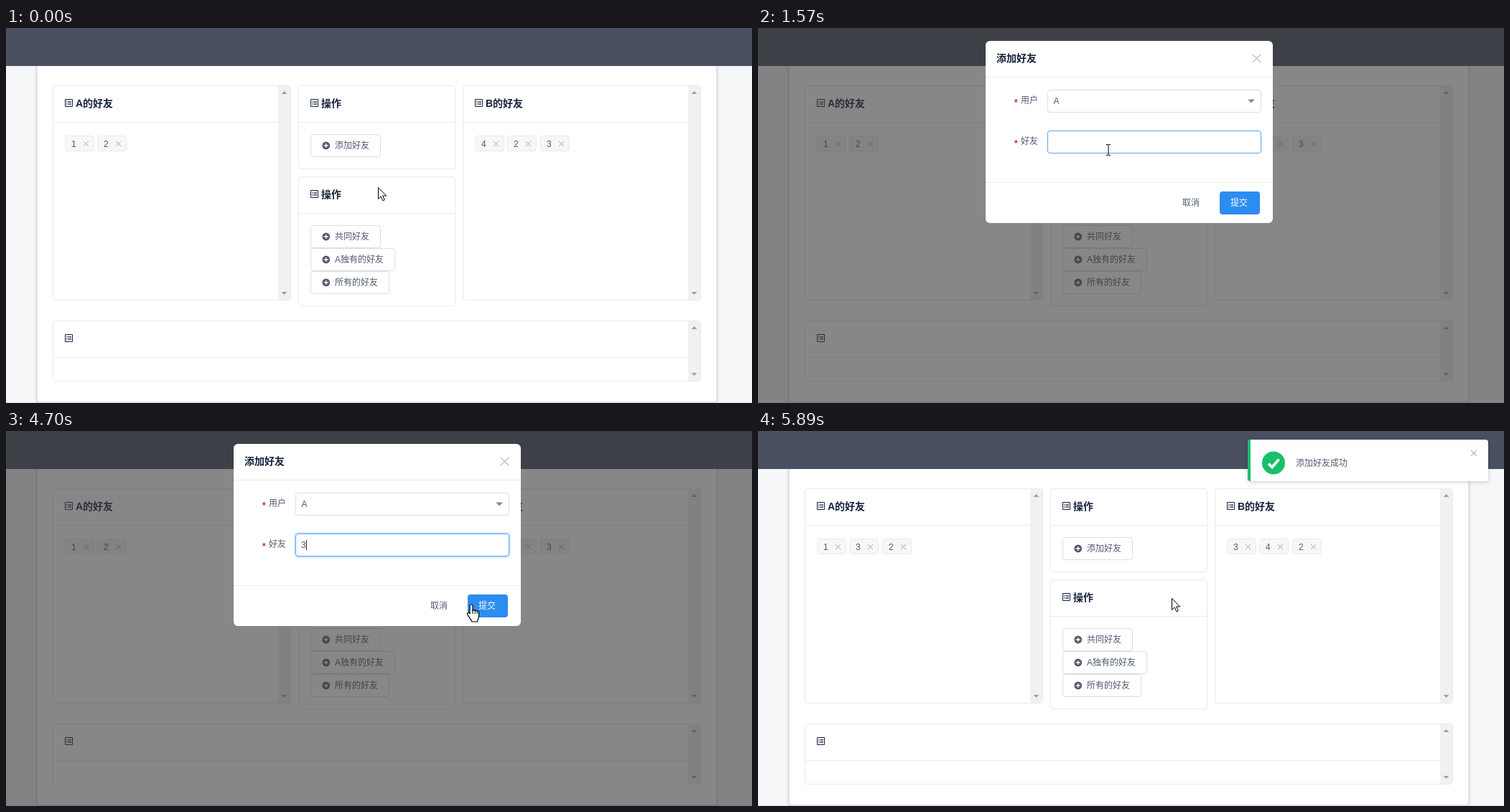
Recreate the animation shown at these times as an HTML page. Size 1039 by 523 pixels, loop 6670 ms.

```html
<!DOCTYPE html>
<html lang="zh-CN">
<head>
<meta charset="utf-8">
<title>好友</title>
<style>
  html, body { margin: 0; width: 100%; height: 100%; overflow: hidden; background: #f5f7f9; }
  svg { display: block; width: 1039px; height: 523px; }
  text { font: 12px "Liberation Sans", "Noto Sans CJK SC", "Noto Sans CJK", sans-serif; fill: #515a6e; white-space: pre; }
  .title { font-size: 14px; font-weight: 700; fill: #17233d; }
  .box { fill: #fff; stroke: #e8eaec; }
  .btn { fill: #fff; stroke: #dcdee2; }
  .line { fill: none; stroke: #e8eaec; }
  .glow { fill: none; stroke: #2d8cf0; stroke-opacity: .22; stroke-width: 2; }
  .pointer path { fill: #fff; stroke: #000; stroke-linejoin: round; }
  .pointer .bare { fill: none; }
  .soft { filter: drop-shadow(0 1px 3px rgba(0,0,0,.2)); }
</style>
</head>
<body>
<svg id="stage" viewBox="0 0 1039 523"></svg>
<script>
const LOOP = 6670;

// ---- markup helpers ----
const rect = (x, y, w, h, attrs = '') => `<rect x="${x}" y="${y}" width="${w}" height="${h}" ${attrs}/>`;
const frame = (x, y, w, h, attrs) => rect(x + .5, y + .5, w - 1, h - 1, 'rx="3.5" ' + attrs);
const text = (x, y, s, attrs = '') => `<text x="${x}" y="${y}" ${attrs}>${s}</text>`;
const path = (d, attrs = '') => `<path d="${d}" ${attrs}/>`;
const group = (id, body, attrs = '') => `<g id="${id}" ${attrs}>${body}</g>`;
const hline = (x1, x2, y) => path(`M${x1} ${y + .5}H${x2}`, 'class="line"');
const cross = (x, y, r, color = '#999') =>
  path(`M${x - r} ${y - r}l${2 * r} ${2 * r}m0 ${-2 * r}l${-2 * r} ${2 * r}`, `fill="none" stroke="${color}"`);

const listIcon = (x, y) =>
  path(`M${x + .5} ${y + .5}h10v10h-10z`, 'fill="none" stroke="#17233d"') +
  path(`M${x + 2} ${y + 3.5}h1.3m1 0h4.7m-7 2h1.3m1 0h4.7m-7 2h1.3m1 0h4.7`, 'fill="none" stroke="#2b3a58"');

function scrollbar(x, y, h) {
  const tri = (ty, d) => path(`M${x + 4.5} ${ty - 2 * d}h8l-4 ${4 * d}z`, 'fill="#a0a0a4"');
  return rect(x, y, 17, h, 'fill="#f0f1f1"') + tri(y + 9, -1) + tri(y + h - 9, 1);
}

function card(x, y, w, h, title, scroll) {
  return frame(x, y, w, h, 'class="box"') +
    hline(x + 1, x + w - 1, y + 51) +
    listIcon(x + 17, y + 19) + text(x + 32, y + 30, title, 'class="title"') +
    (scroll ? scrollbar(x + w - 18, y + 1, h - 2) : '');
}

function button(x, y, w, label, id = '') {
  return frame(x, y, w, 32, `class="btn" id="${id}Box"`) +
    `<circle cx="${x + 21.8}" cy="${y + 16}" r="5.4" fill="#515a6e"/>` +
    path(`M${x + 18.8} ${y + 16}h6m-3 -3v6`, 'stroke="#fff" stroke-width="1.3"') +
    text(x + 34, y + 20, label, `id="${id}Label"`);
}

const tag = (x, n) => frame(x, 150, 41, 22, 'fill="#f7f7f7" stroke="#e8eaec"') +
  text(x + 9, 166, n) + cross(x + 29.5, 161.5, 3.5, '#a0a4ac');
const tags = (x, list) => list.map((n, i) => tag(x + Math.round(i * 45.3), n)).join('');

const field = (id, y, label) =>
  text(357, y + 22, '*', 'style="fill:#b23a2c;font-weight:700"') + text(366, y + 19, label) +
  rect(402, y - 1, 300, 34, `rx="5" class="glow" id="${id}Glow"`) +
  frame(403, y, 298, 32, `class="btn" id="${id}Box"`);

// ---- scene ----
const page =
  rect(0, 0, 1039, 523, 'fill="#f5f7f9"') +
  rect(43.5, 40, 946, 481.5, 'rx="4" fill="#fff" style="filter:drop-shadow(0 1px 2px rgba(0,0,0,.3))"') +
  rect(0, 0, 1039, 53, 'fill="#4a4f62"') +
  rect(0, 522, 1039, 1, 'fill="#dcdfe2"') +
  card(65, 80, 332, 300, 'A的好友', true) +
  card(407, 80, 219, 117, '操作') +
  card(407, 207, 219, 181, '操作') +
  card(636, 80, 332, 300, 'B的好友', true) +
  card(65, 408, 903, 85, '', true) +
  button(424, 148, 98, '添加好友', 'add') +
  button(424, 275, 98, '共同好友', 'both') +
  button(424, 307, 118, 'A独有的好友', 'only') +
  button(424, 339, 110, '所有的好友', 'all') +
  group('before', tags(82, [1, 2]) + tags(653, [4, 2, 3])) +
  group('after', tags(82, [1, 3]) + tags(653, [3, 4, 2]) + group('added', tag(173, 2)));

const menu =
  rect(403, 123, 298, 67, 'rx="4" fill="#fff" class="soft"') +
  rect(403, 128, 298, 28.5, 'fill="#468fda"') +
  text(419, 146.5, 'A', 'style="fill:#fff;font-weight:700"') + text(419, 175, 'B');

const modal =
  rect(317, 18, 400, 254, 'rx="6" fill="#fff"') +
  text(332, 47, '添加好友', 'class="title"') + cross(694.5, 42.5, 5.5) +
  hline(317, 717, 68) + hline(317, 717, 215) +
  field('user', 86, '用户') + text(411.5, 106, 'A') +
  path('M-4.7 -2.5h9.4l-4.7 5z', 'id="caretDown" fill="#808695"') +
  field('friend', 143, '好友') + text(411, 163, '3', 'id="typed"') +
  rect(411, 152, 1, 14, 'id="caret" fill="#222"') +
  text(591, 248, '取消') +
  rect(642, 227, 58, 34, 'rx="5" class="glow" id="submitGlow"') +
  rect(643, 228, 56, 32, 'rx="4" id="submit"') +
  text(658, 248, '提交', 'style="fill:#fff;font-weight:500"') +
  group('menu', menu);

const notice =
  rect(0, 12, 335, 58, 'rx="4" fill="#fff" class="soft"') +
  path('M4 12v58a4 4 0 0 1 -4 -4v-50a4 4 0 0 1 4 -4z', 'fill="#19be6b"') +
  '<circle cx="36" cy="44.5" r="16" fill="#19be6b"/>' +
  path('M29 45.5l5 5 9.5 -11', 'fill="none" stroke="#fff" stroke-width="3.6"') +
  text(67, 48.5, '添加好友成功') + cross(315, 31, 4);

const pointers =
  group('arrow', path('M.5 .5v16l3.7 -3.6 2.7 6 2.4 -1.1 -2.6 -5.8h5z')) +
  group('hand',
    path('M-2 13V2a2 2 0 0 1 4 0V9a1.6 1.6 0 0 1 3.2 .4a1.5 1.5 0 0 1 3 .6a1.3 1.3 0 0 1 2.3 1.2V16c0 3 -1.6 4.5 -2 8H1C0 20.500 -4 17 -5.500 13.500C-6.300 11.500 -3.500 10.500 -2 13z', 'stroke-width="1.2"') +
    path('M2 8.5v4.500M5.200 9.500v3.500M8.200 10v3', 'class="bare"')) +
  group('beam', path('M-3 -7.5h2.2l.8 .8 .8 -.8h2.200M0 -7v14M-3 7.500h2.200l.8 -.8 .8 .8h2.200', 'class="bare"'));

document.getElementById('stage').innerHTML = page +
  rect(0, 0, 1039, 523, 'id="mask" fill="#373737"') +
  group('modal', modal) + group('notice', notice) +
  group('pointer', pointers, 'class="pointer"');

// ---- motion ----
const $ = id => document.getElementById(id);
const set = (id, name, value) => $(id).setAttribute(name, value);
const show = (id, on) => set(id, 'opacity', +on);
const clamp = v => Math.max(0, Math.min(1, v));
const ramp = (t, start, length) => clamp((t - start) / length);
const mix = (a, b, p) => a + (b - a) * p;
const within = (t, a, b) => t >= a && t < b;

function bezier(x1, y1, x2, y2) {
  const at = (a, b, s) => 3 * a * s * (1 - s) ** 2 + 3 * b * s * s * (1 - s) + s ** 3;
  return x => {
    let lo = 0, hi = 1;
    for (let i = 0; i < 24; i++) {
      const mid = (lo + hi) / 2;
      if (at(x1, x2, mid) < x) lo = mid; else hi = mid;
    }
    return at(y1, y2, lo);
  };
}
const ease = bezier(.25, .1, .25, 1);
const easeInOut = bezier(.42, 0, .58, 1);

const bursts = [
  [0, 0, 1], [70, 100, 2], [250, 800, 8], [1110, 1720, 9], [1810, 1960, 3],
  [2130, 2510, 6], [2740, 3390, 9], [3460, 3690, 4], [4010, 4010, 1],
  [4240, 4870, 9], [4940, 4940, 1], [5110, 5110, 1], [5260, 5890, 9]
];
const ticks = bursts.flatMap(([a, b, n]) =>
  Array.from({ length: n }, (_, i) => n > 1 ? a + (b - a) * i / (n - 1) : a));
const hold = t => ticks.findLast(s => s <= t + 12 || s === 0);

// time, x, y
const track = [
  [0, 518, 222], [70, 518, 223], [100, 517.5, 224], [180, 517.5, 224],
  [800, 488, 170], [1780, 488, 170], [1960, 487, 116], [2100, 487, 116],
  [2510, 483, 104.5], [2740, 483, 104.5], [2980, 482, 139], [3160, 482, 141],
  [3390, 484, 160], [4240, 484, 160], [4712, 648, 242], [4870, 655, 247],
  [4940, 662, 247], [5260, 662, 248], [5810, 576, 233], [LOOP, 576, 233]
];
// time from which each pointer shape applies
const shapes = [
  [0, 'arrow'], [700, 'hand'], [1330, 'beam'], [1900, 'hand'],
  [3250, 'beam'], [4300, 'arrow'], [4650, 'hand'], [5420, 'arrow']
];

function movePointer(t) {
  const i = Math.max(1, track.findIndex(k => k[0] >= t));
  const [a, b] = [track[i - 1], track[i]];
  const p = clamp((t - a[0]) / (b[0] - a[0]));
  set('pointer', 'transform', `translate(${mix(a[1], b[1], p)} ${mix(a[2], b[2], p)})`);
  const shape = shapes.findLast(s => s[0] <= t)[1];
  for (const id of ['arrow', 'hand', 'beam']) show(id, id === shape);
}

function styleField(id, hover, focus) {
  $(id + 'Box').style.stroke = hover || focus ? '#57a3f3' : '#dcdee2';
  show(id + 'Glow', focus);
}

function draw(now) {
  const t = hold(now);

  const hoverAdd = within(t, 700, 1260);
  $('addBox').style.stroke = hoverAdd ? '#57a3f3' : '#dcdee2';
  $('addLabel').style.fill = hoverAdd ? '#57a3f3' : '#515a6e';

  const saved = t >= 5200;
  show('before', !saved);
  show('after', saved);
  show('added', ease(ramp(t, 5245, 250)));

  // dialog
  const leaving = t > 5000;
  const dim = leaving ? 1 - ramp(t, 5180, 300) : ramp(t, 1240, 300);
  const open = leaving ? 1 - ease(ramp(t, 5185, 300)) : ease(dim);
  show('mask', 0);
  set('mask', 'opacity', .6 * dim);
  set('modal', 'opacity', open);
  set('modal', 'transform', `translate(517 145) scale(${mix(.9, 1, open)}) translate(-517 -145)`);

  // form
  styleField('user', within(t, 1880, 2640), within(t, 2640, 3460));
  styleField('friend', within(t, 1240, 1880), within(t, 3460, 5110));
  show('typed', t >= 4240);
  show('caret', within(t, 3460, 4010) || within(t, 4240, 4780));
  set('caret', 'x', t >= 4240 ? 418 : 411);
  set('submit', 'fill', t >= 4780 ? '#57a3f3' : '#2d8cf0');
  show('submitGlow', t >= 5110);

  // select menu
  const drop = ease(ramp(t, 2630, 200)) - ease(ramp(t, 3040, 200));
  set('menu', 'opacity', clamp(drop * 1.25));
  set('menu', 'transform', `translate(0 123) scale(1 ${mix(.8, 1, drop)}) translate(0 -123)`);
  set('caretDown', 'transform', `translate(687 102) rotate(${180 * drop})`);

  // notice
  const slide = easeInOut(ramp(t, 5155, 300));
  set('notice', 'opacity', slide);
  set('notice', 'transform', `translate(${mix(1017, 682, slide)} 0)`);

  movePointer(t);
}

const begin = performance.now();
function tick() {
  draw((performance.now() - begin) % LOOP);
  requestAnimationFrame(tick);
}
tick();
</script>
</body>
</html>
```
